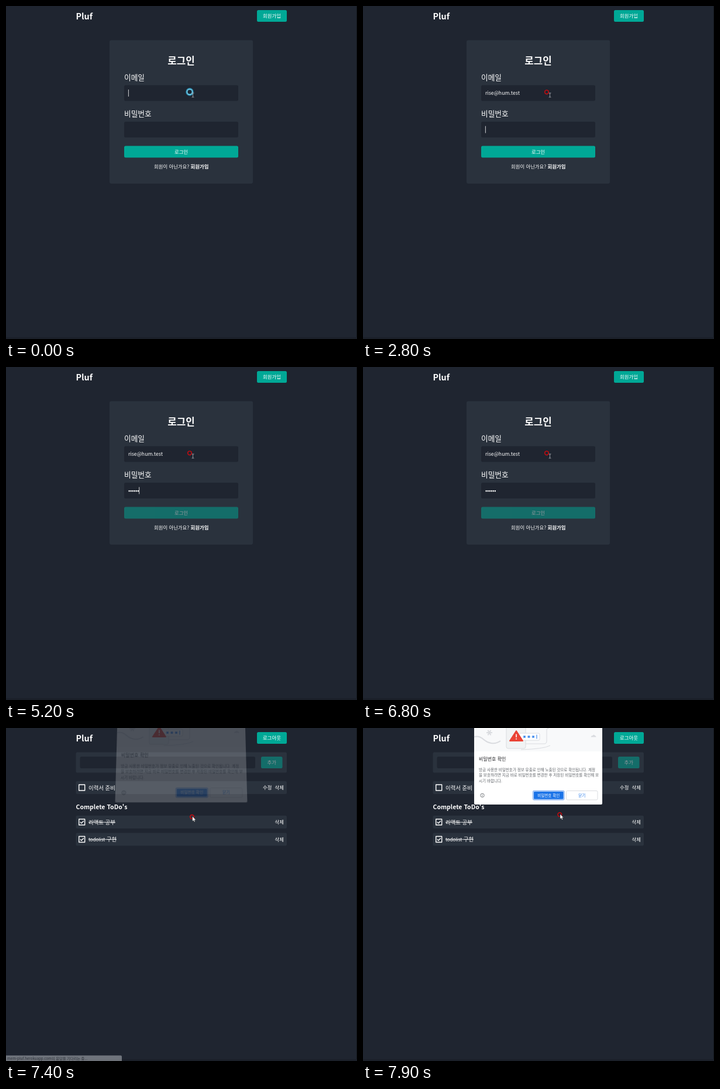
Recreate the animation shown at these times as an HTML page. Size 600 by 570 pixels, loop 8 s.

```html
<!DOCTYPE html>
<html lang="ko">
<head>
<meta charset="utf-8">
<style>
  html, body { margin: 0; width: 100%; height: 100%; overflow: hidden; background: #1f2530; }
  svg { position: absolute; left: 0; top: 0; }
  text { font: 8.4px "Noto Sans CJK KR", "Noto Sans CJK", sans-serif; fill: #fff; white-space: pre; }
  .mid { text-anchor: middle; }
  .bold { font-weight: 700; }
  .label { font-size: 12.65px; }
  .item { font-size: 9.4px; }
  .latin { font-size: 7.9px; }
  .card { fill: #2a323d; }
  .field { fill: #1f2530; }
  .teal { fill: #00a896; }
  .line { fill: none; stroke: #fff; }
  #dialog { transform-origin: 300px 8px; }
  #dialog text { font-size: 6.55px; fill: #5f6368; }
  #dialog .title { font-size: 8px; fill: #202124; }
  #dialog .blue { fill: #1a73e8; }
  #dialog .white { fill: #fff; }
  .gray { fill: none; stroke: #dadce0; }
</style>
</head>
<body>
<svg width="600" height="570">
  <rect x="599" width="1" height="570" fill="#14181f"/>
  <rect y="567" width="600" height="3" fill="#1b2029"/>
  <text class="bold" x="119.5" y="22.5" style="font-size:14.3px">Pluf</text>
  <rect class="teal" x="429" y="7" width="51" height="20" rx="2.5"/>
  <text class="mid" id="account" x="454.5" y="20.2"></text>

  <g id="login">
    <rect class="card" x="177" y="58.5" width="245" height="245.5" rx="3"/>
    <text class="mid bold" x="299.5" y="100" style="font-size:16.8px">로그인</text>
    <text class="label" x="202" y="126.8">이메일</text>
    <rect class="field" x="202" y="135.5" width="195" height="27" rx="2.5"/>
    <text id="email" x="209" y="152.4" style="font-size:8.7px"></text>
    <text class="label" x="202" y="189.3">비밀번호</text>
    <rect class="field" x="202" y="198" width="195" height="27" rx="2.5"/>
    <path id="dots" class="line" stroke-width="2.5" stroke-linecap="round" stroke-dasharray="0 3.05"/>
    <path id="caret" class="line" stroke-width=".8"/>
    <g id="submit">
      <rect class="teal" x="202" y="239.5" width="195" height="20" rx="2.5"/>
      <text class="mid" x="299.5" y="253">로그인</text>
    </g>
    <text class="mid" x="299.7" y="278">회원이 아닌가요? <tspan class="bold">회원가입</tspan></text>
  </g>

  <g id="todos">
    <rect class="card" x="119.5" y="41.5" width="360.5" height="35" rx="2.5"/>
    <rect class="field" x="126.5" y="49" width="299.5" height="20" rx="2.5"/>
    <g opacity=".5">
      <rect class="teal" x="436" y="49" width="36.5" height="20" rx="2.5"/>
      <text class="mid" x="454.3" y="62.2">추가</text>
    </g>
    <rect class="card" x="119.5" y="91" width="360.5" height="22" rx="2.5"/>
    <rect class="card" x="119.5" y="150" width="360.5" height="22" rx="2.5"/>
    <rect class="card" x="119.5" y="179.5" width="360.5" height="22" rx="2.5"/>
    <path class="line" stroke-width="1.4" stroke-linejoin="round"
      d="M124.7 97h10v10h-10zM124.7 156h10v10h-10zm2.2 5 2 2 4-4M124.7 185.5h10v10h-10zm2.2 5 2 2 4-4"/>
    <text class="item" x="141" y="105.6">이력서 준비</text>
    <text class="item" x="141" y="164.6">리액트 공부</text>
    <text class="item" x="141" y="194.1"><tspan class="latin">todolist</tspan> 구현</text>
    <path class="line" stroke-width=".8" d="M141 161.3h46M141 190.8h48"/>
    <text class="bold" x="119.5" y="139.2" style="font-size:10.5px">Complete ToDo's</text>
    <text x="439" y="105.2">수정</text>
    <text x="459.5" y="105.2">삭제</text>
    <text x="459.5" y="164.2">삭제</text>
    <text x="459.5" y="193.7">삭제</text>
  </g>

  <g id="status">
    <path fill="#dee1e6" d="M0 560.5h196q2 0 2 2V570H0z"/>
    <text x="2" y="567.6" style="font-size:6.2px;fill:#3c4043">mem-pluf.herokuapp.com의 응답을 기다리는 중...</text>
  </g>
</svg>

<svg id="dialog" width="600" height="570">
  <path fill="#fff" d="M190 0h219v129q0 2-2 2H192q-2 0-2-2z"/>
  <path fill="#f8f9fa" d="M190 0h219v40H190z"/>
  <path class="gray" stroke-width="2" d="M211 8h10M213.500 3.700l5 8.600M218.500 3.700l-5 8.600"/>
  <path class="gray" stroke-width="2" d="M190 15c9-2 13 2 18 6s16 9 27 1"/>
  <path class="gray" fill="#fff" d="M278 27h32q4 0 4-5V3q0-3 4-3M270 37q38-1 50-7"/>
  <rect class="gray" x="245" y="-6" width="33" height="41" rx="3" style="fill:#f1f3f4"/>
  <rect class="gray" x="266" y="9" width="36" height="12" rx="2" style="fill:#fff"/>
  <path stroke="#1a73e8" fill="none" d="M273.500 15h5M274.700 12.800l2.600 4.400M277.300 12.800l-2.600 4.400M281 15h5M282.200 12.800l2.600 4.400M284.800 12.800l-2.600 4.400M288.500 15h5M289.700 12.800l2.600 4.400M292.300 12.800l-2.600 4.400M297 11.500v7"/>
  <path fill="#ea4335" stroke="#ea4335" stroke-width="2" stroke-linejoin="round" d="M262 5l11 17h-22z"/>
  <path stroke="#fff" stroke-width="1.6" d="M262 10.500v5.500M262 17.700v1.700"/>
  <path fill="#dadce0" d="M389.500 15.500q.5-3 3-2.500 2-3 4 0 2 0 2 2.500z"/>
  <text class="title" x="198" y="56.200">비밀번호 확인</text>
  <text x="198" y="73.600">방금 사용한 비밀번호가 정보 유출로 인해 노출된 것으로 확인됩니다. 계정</text>
  <text x="198" y="83.400">을 보호하려면 지금 바로 비밀번호를 변경한 후 저장된 비밀번호를 확인해 보</text>
  <text x="198" y="93.200">시기 바랍니다.</text>
  <circle cx="204" cy="115.300" r="3.200" fill="none" stroke="#5f6368" stroke-width=".8"/>
  <path stroke="#5f6368" stroke-width=".8" d="M204 113.300v.8M204 114.800v2.400"/>
  <rect x="290.500" y="107.500" width="53.500" height="15.500" rx="2.500" fill="#fff" stroke="#8ab4f3" stroke-width="1.300"/>
  <rect class="blue" x="291.800" y="108.800" width="50.900" height="12.900" rx="1.500"/>
  <text class="mid white" x="317.200" y="117.500">비밀번호 확인</text>
  <rect class="gray" x="347.500" y="107.500" width="53.500" height="15.500" rx="2"/>
  <text class="mid blue" x="374.200" y="117.500">닫기</text>
</svg>

<svg width="600" height="570">
  <g id="busy" fill="none">
    <circle cx="314" cy="147" r="5" stroke="#2b8fb5" stroke-width="3.400"/>
    <circle cx="314" cy="147" r="4.600" stroke="#8fd4e6" stroke-width="1.100"/>
  </g>
  <circle id="ring" r="3.300" fill="none" stroke="#b80d12" stroke-width="1.700"/>
  <path id="beam" fill="none" stroke="#aeb2b8" stroke-width=".8" d="M317.500 149h4M319.500 149v7M317.500 156h4"/>
  <path id="arrow" fill="#fff" stroke="#222" stroke-width=".4" d="M0 0v8.300l1.900-1.700 1.300 2.900 1.300-.6-1.300-2.800h2.600z"/>
</svg>

<script>
const LOOP = 8000;
const EMAIL = "rise@hum.test";
const EMAIL_KEYS = [300, 600, 600, 800, 1000, 1300, 1500, 1600, 1800, 2200, 2400, 2500, 2600];
const PASSWORD_KEYS = [3600, 3700, 3800, 4000, 4100, 4300];
const DOT = 3.05;

const $ = id => document.getElementById(id);
const show = (id, on) => $(id).style.display = on ? "" : "none";
const clamp = v => Math.min(1, Math.max(0, v));
const typed = (keys, t) => keys.filter(k => k <= t).length;
const within = (t, ...spans) => spans.some(([a, b]) => t >= a && t < b);

function drawLogin(t) {
  $("email").textContent = EMAIL.slice(0, typed(EMAIL_KEYS, t));
  const n = typed(PASSWORD_KEYS, t);
  show("dots", n);
  $("dots").setAttribute("d", `M210.600 212.300h${Math.max(0, n - 1) * DOT + .05}`);

  const inEmail = t < 2800;
  const x = 209.4 + (inEmail ? $("email").getComputedTextLength() : n * DOT);
  $("caret").setAttribute("d", `M${x} ${inEmail ? 143 : 205.5}v12`);
  show("caret", within(t, [0, 3400], [3600, 4600], [5200, 5700], [6200, 6800]));
  $("submit").setAttribute("opacity", 1 - .5 * clamp((t - 4300) / 300));
}

function drawDialog(t) {
  show("dialog", t >= 7400);
  const left = (1 - clamp((t - 7400) / 300)) ** 2;
  $("dialog").style.opacity = 1 - .8 * left;
  $("dialog").style.transform = left
    ? `translateY(${-7 * left}px) perspective(400px) rotateX(${5.8 * left}deg)` : "none";
}

function drawPointer(t, loggedIn) {
  const [x, y] = t >= 7900 ? [337, 147.5] : [318.7, 151.3];
  show("busy", t < 100);
  show("ring", t >= 100);
  show("beam", !loggedIn);
  show("arrow", loggedIn);
  $("arrow").setAttribute("transform", `translate(${x} ${y})`);
  $("ring").setAttribute("transform", loggedIn ? `translate(${x - .7} ${y + .7})` : "translate(314 147.300)");
}

function draw(t) {
  const loggedIn = t >= 7000;
  $("account").textContent = loggedIn ? "로그아웃" : "회원가입";
  show("login", !loggedIn);
  show("todos", loggedIn);
  show("status", loggedIn && t < 7500);
  $("status").setAttribute("opacity", t < 7100 ? .5 : t < 7400 ? 1 : .42);
  drawLogin(t);
  drawDialog(t);
  drawPointer(t, loggedIn);
}

const start = performance.now();
function tick() {
  draw((performance.now() - start) % LOOP);
  requestAnimationFrame(tick);
}
tick();
</script>
</body>
</html>
```
